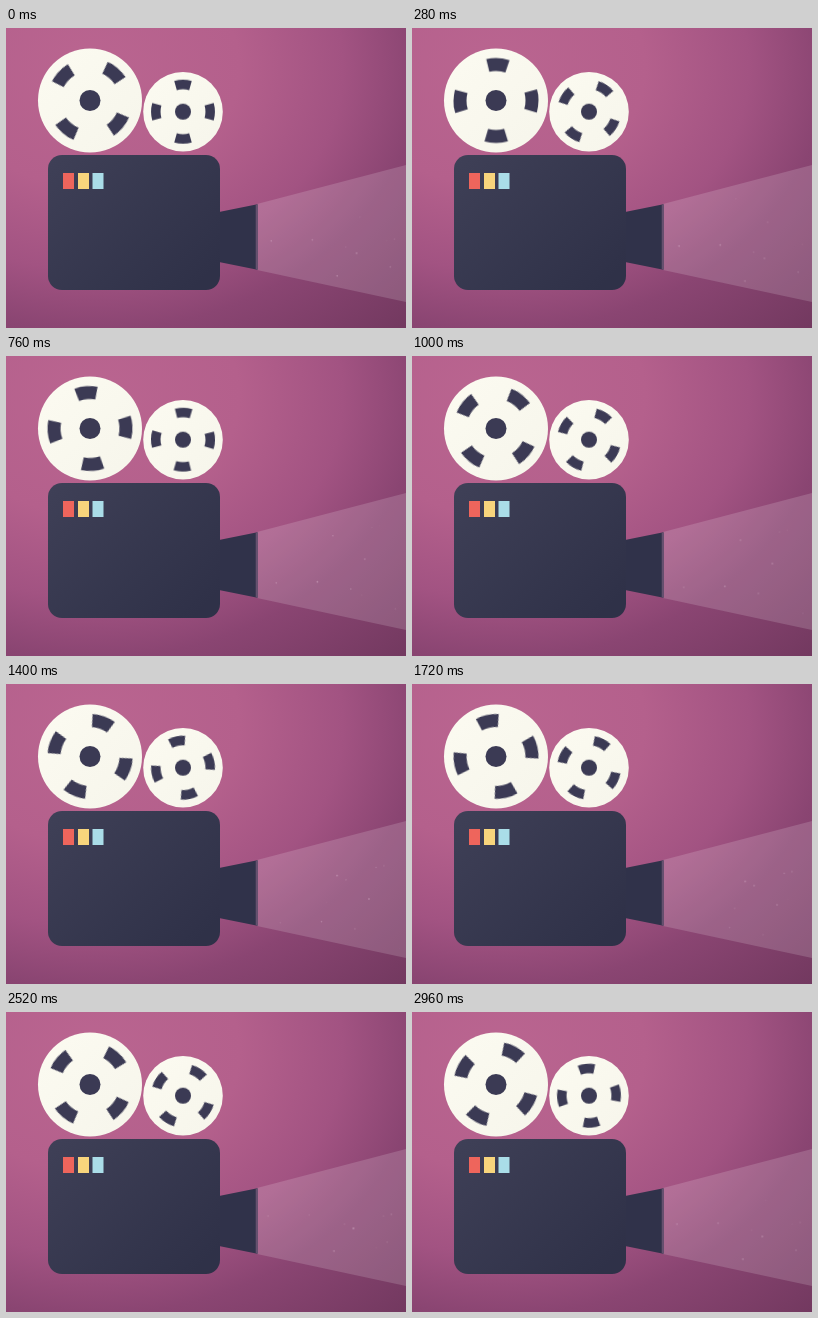
An HTML page for the animation above (3000 ms loop, 400 by 300 pixels).

```html
<!DOCTYPE html>
<html lang="en">
<head>
<meta charset="utf-8">
<title>Film projector</title>
<style>
  html, body { margin: 0; width: 100%; height: 100%; overflow: hidden; background: #b9648f; }
  svg { display: block; width: 100vw; height: 100vh; }
  .disc { fill: url(#cream); }
  .hub { fill: #3b3a54; }
  .slots { fill: none; stroke: #3b3a54; stroke-dashoffset: 16; }
  .large .slots { stroke-dasharray: 32 57 32 62 32 56 32 57; }
  .small .slots { stroke-dasharray: 32 58; }
  .spin { animation: spin 3s steps(75) infinite; }
  .large { --from: 39.7deg; --to: 575.2deg; }
  .small { --from: 0deg; --to: 360deg; }
  .mote { fill: #f6dcec; animation: drift 3s steps(38) infinite; }
  @keyframes spin {
    from { transform: rotate(var(--from)); }
    to { transform: rotate(var(--to)); }
  }
  @keyframes drift {
    from { transform: translate(-10px, -28px); opacity: 0; }
    50% { transform: none; opacity: var(--glow); }
    to { transform: translate(10px, 28px); opacity: 0; }
  }
</style>
</head>
<body>
<svg viewBox="0 0 400 300">
  <defs>
    <radialGradient id="wall" gradientUnits="userSpaceOnUse" cx="0" cy="0" r="450"
                    gradientTransform="translate(85 40) scale(1 .8)">
      <stop offset="0" stop-color="#ba6590"/>
      <stop offset=".33" stop-color="#b4608c"/>
      <stop offset=".56" stop-color="#a25382"/>
      <stop offset=".73" stop-color="#8a4572"/>
      <stop offset="1" stop-color="#733960"/>
    </radialGradient>
    <linearGradient id="metal" x1="0" y1="0" x2="1" y2=".8">
      <stop offset="0" stop-color="#3f4057"/>
      <stop offset="1" stop-color="#2f3148"/>
    </linearGradient>
    <linearGradient id="cream" x1="0" y1="0" x2="1" y2="1">
      <stop offset="0" stop-color="#fcfbf1"/>
      <stop offset="1" stop-color="#f6f5eb"/>
    </linearGradient>
    <clipPath id="cone"><path d="M251 176 400 137V274L251 242Z"/></clipPath>
  </defs>

  <rect width="400" height="300" fill="url(#wall)"/>
  <g clip-path="url(#cone)">
    <rect x="251" y="137" width="149" height="137" fill="#fff" opacity=".155"/>
    <g id="dust"></g>
  </g>

  <path d="M213 184 251.500 176.300V241.700L213 234Z" fill="#30324a"/>
  <path d="M249.700 176.700 251.700 176.300V241.700L249.700 241.300Z" fill="#65516f"/>
  <rect x="42" y="127" width="172" height="135" rx="14" fill="url(#metal)"/>
  <rect x="57" y="145" width="11" height="16" fill="#ee655c"/>
  <rect x="72" y="145" width="11" height="16" fill="#f8d57c"/>
  <rect x="86.500" y="145" width="11" height="16" fill="#aadde8"/>

  <g transform="translate(84 72.500)">
    <circle class="disc" r="52"/>
    <g class="spin large">
      <circle class="slots" r="36" stroke-width="13" pathLength="360"/>
    </g>
    <circle class="hub" r="10.500"/>
  </g>
  <g transform="translate(177 83.700)">
    <circle class="disc" r="39.800"/>
    <g class="spin small">
      <circle class="slots" r="27.200" stroke-width="9.500" pathLength="360"/>
    </g>
    <circle class="hub" r="8"/>
  </g>
</svg>
<script>
  const MOTES = 10;
  const dust = document.getElementById("dust");

  let seed = 7;
  const random = () => (seed = seed * 16807 % 2147483647) / 2147483647;
  for (let i = 0; i < 5; i++) random();

  for (let i = 0; i < MOTES; i++) {
    const x = 260 + 135 * random();
    const reach = 33 + (x - 251) * .235;
    const y = 208 + (random() * 2 - 1) * reach * .8;

    const mote = document.createElementNS("http://www.w3.org/2000/svg", "circle");
    mote.setAttribute("class", "mote");
    mote.setAttribute("cx", x);
    mote.setAttribute("cy", y);
    mote.setAttribute("r", .8);
    mote.style.setProperty("--glow", .2 + .4 * random());
    mote.style.animationDelay = `${-Math.floor(i / MOTES * 75) * 40}ms`;
    dust.append(mote);
  }
</script>
</body>
</html>
```
